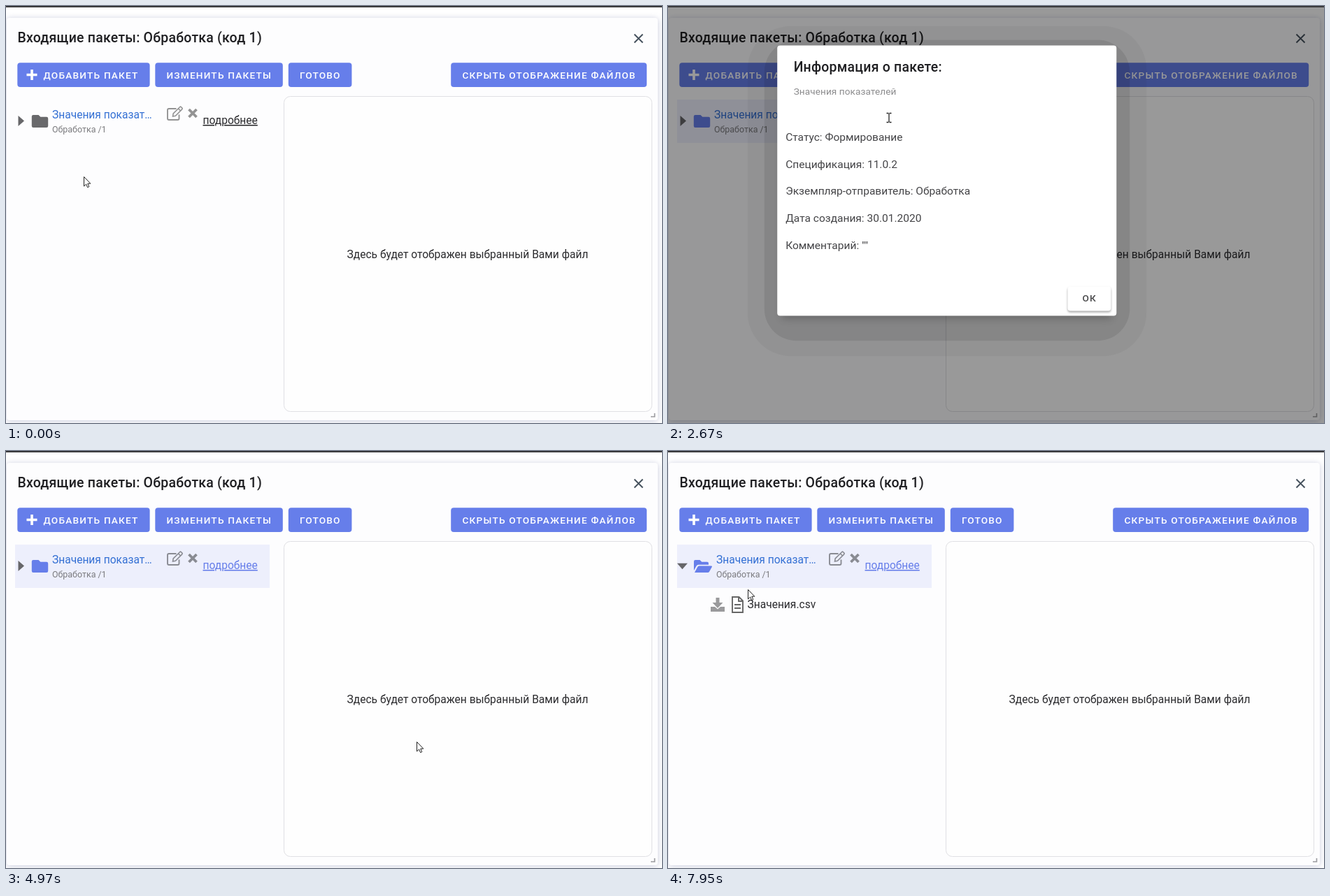
Write an HTML page that moves like this. It is 938x597 px and loops after 8 s.

```html
<!DOCTYPE html>
<html lang="ru">
<head>
<meta charset="utf-8">
<style>
html, body { margin: 0; width: 100%; height: 100%; overflow: hidden; background: #fff; }
svg { display: block; width: 100vw; height: 100vh; font: 15.57px Roboto, Arial, sans-serif; fill: #2b2b2e; }
.title { font-size: 19.46px; font-weight: 500; letter-spacing: .24px; fill: #1f1f22; }
.btn { font-size: 13.62px; font-weight: 500; letter-spacing: 1.216px; }
.small { font-size: 12.45px; }
.sub { font-size: 13.62px; letter-spacing: .1px; }
.line { fill: none; stroke-linecap: butt; }
.mark { fill: #fff; stroke: #222; }
#panel { filter: drop-shadow(0 1px 4px rgba(70, 80, 140, .3)); }
#under { filter: blur(6px); }
#ok { filter: drop-shadow(0 2px 1.5px rgba(0, 0, 0, .35)); }
</style>
</head>
<body>
<svg viewBox="0 0 938 597" preserveAspectRatio="none">
  <rect id="panel" x="1" y="17" width="931" height="576" rx="4" fill="#fdfdfe"/>
  <rect width="938" height="2" fill="#3a3a3c"/>
  <text class="title" x="16.500" y="52">Входящие пакеты: Обработка (код 1)</text>
  <path class="line" d="M898.500 40.500l12 12m0-12l-12 12" stroke="#46525e" stroke-width="1.900"/>
  <g fill="#667eea">
    <rect x="16.300" y="81.300" width="189.300" height="34.600" rx="4"/>
    <rect x="213.300" y="81.300" width="182.500" height="34.600" rx="4"/>
    <rect x="403.800" y="81.300" width="90.600" height="34.600" rx="4"/>
    <rect x="636.200" y="81.300" width="280" height="34.600" rx="4"/>
  </g>
  <path class="line" d="M29.500 98.500h15M37 91v15" stroke="#fff" stroke-width="3.600"/>
  <g class="btn" fill="#fff">
    <text x="53.500" y="103.500">ДОБАВИТЬ ПАКЕТ</text>
    <text x="229.500" y="103.500">ИЗМЕНИТЬ ПАКЕТЫ</text>
    <text x="420" y="103.500">ГОТОВО</text>
    <text x="652.500" y="103.500">СКРЫТЬ ОТОБРАЖЕНИЕ ФАЙЛОВ</text>
  </g>
  <rect x="397.500" y="129.500" width="526" height="451" rx="9" fill="#fefefe" stroke="#e0e0e4"/>
  <text x="660" y="360.500" text-anchor="middle">Здесь будет отображен выбранный Вами файл</text>
  <path class="line" d="M922 588h5.500v-5" stroke="#9a9a9e" stroke-width="1.600"/>

  <rect id="row" x="13" y="134" width="364" height="62" fill="#edeffc"/>
  <path id="toggle" d="M-4.200-7.500L4.300 0-4.200 7.500z" fill="#666669"/>
  <path id="closed" d="M39 156h7.500l2.800 2.800H58a2.200 2.200 0 0 1 2.200 2.200v10.800A2.200 2.200 0 0 1 58 174H39a2.200 2.200 0 0 1-2.200-2.200v-13.600A2.200 2.200 0 0 1 39 156z"/>
  <path id="opened" fill="#667eea" d="M37 171v-13q0-2 2-2h6.500l2.800 2.800H56q2 0 2 2v2H43.500q-1.800 0-2.700 1.500zM38 174l4.300-8q.7-1.500 2.300-1.500H62q1.600 0 .8 1.500l-3.600 6.500q-.8 1.500-2.500 1.500z"/>
  <g id="name">
    <text x="66" y="161" fill="#3470d4">Значения показат…</text>
    <text class="small" x="66" y="181" fill="#7b7b7e">Обработка /1</text>
  </g>
  <g class="line" stroke="#000" stroke-opacity=".42">
    <path d="M243.500 147H233a2 2 0 0 0-2 2v12a2 2 0 0 0 2 2h12.500a2 2 0 0 0 2-2v-5.500" stroke-width="1.900"/>
    <path d="M238.500 158l.7-4 9.300-9.300q1-1 2 0l1.200 1.200q1 1 0 2l-9.300 9.300zM246.500 147l3 3" stroke-width="1.600"/>
    <path d="M261.500 148l11 11m0-11l-11 11" stroke-width="3.800"/>
  </g>
  <text id="more" x="281.500" y="169" text-decoration="underline">подробнее</text>
  <g id="file">
    <path d="M68.500 210h5v7h5L71 225l-7.500-8h5zM61 223h6l4 3.500 4-3.500h6v7H61z" fill="#9a9a9c"/>
    <path class="line" d="M92 209h9.500l5.500 5.500V231H92zM101 209v6h6M95 220h9M95 225h9" stroke="#666" stroke-width="1.900"/>
    <text x="113.500" y="225">Значения.csv</text>
  </g>

  <rect id="shade" y="2" width="938" height="595" fill="#000"/>
  <g id="dialog">
    <rect id="halo" x="113" y="28" width="572" height="474" rx="62" opacity=".04" fill="#000"/>
    <rect x="137" y="48" width="524" height="432" rx="46" opacity=".09" fill="#000"/>
    <rect id="under" x="162" y="74" width="473" height="374" opacity=".22" fill="#000"/>
    <rect x="155.500" y="56" width="486.500" height="388" rx="4" fill="#fff"/>
    <text class="title" x="179" y="94">Информация о пакете:</text>
    <text class="sub" x="179" y="127" fill="#8b8b8d">Значения показателей</text>
    <g id="facts" fill="#444447"></g>
    <rect id="ok" x="572" y="402" width="62" height="35" rx="4"/>
    <text class="btn" x="593" y="423.500" fill="#4a4a4c">ОК</text>
  </g>

  <g id="cursor">
    <path id="arrow" class="mark" d="M.5.5V14l3.100-3 2 4.700 2.200-1-2-4.500h4z"/>
    <path id="hand" class="mark" d="M-1.500 10V1.500a1.400 1.400 0 0 1 2.900 0V6.200q2.500-.6 2.700.8 2.300-.5 2.500.9 2-.2 2 1.600V13l-1.500 4.500h-8L-5.400 11q-.8-1.800 1-2 1.400.2 2.900 2.500z"/>
    <path id="beam" class="line" d="M-3.500-6.500h3M.5-6.500h3M0-6V6M-3.500 6.500h3M.5 6.500h3" stroke="#222" stroke-width="1.300"/>
  </g>
</svg>
<script>
const $ = id => document.getElementById(id);
const set = (id, name, value) => $(id).setAttribute(name, value);
const show = (id, on) => { $(id).style.display = on ? '' : 'none'; };

$('facts').innerHTML = ['Статус: Формирование', 'Спецификация: 11.0.2',
  'Экземпляр-отправитель: Обработка', 'Дата создания: 30.01.2020', 'Комментарий: ""']
  .map((s, i) => `<text x="167.5" y="${192.7 + i * 38.8}">${s}</text>`).join('');

// Pointer moves: start, end, number of steps, from, to
const moves = [
  [1220, 1950, 6, [111, 244], [316, 166]],
  [3390, 4400, 8, [316, 160], [587, 416]],
  [5120, 5730, 5, [587, 416], [173, 279]],
  [5880, 5880, 1, [173, 279], [57, 224]],
  [6025, 6460, 4, [57, 224], [20, 161]],
  [7670, 7950, 3, [20, 161], [114, 198]]
];
const smooth = p => p * p * (3 - 2 * p);

function pointer(t) {
  let at = moves[0][3];
  for (const [start, end, n, from, to] of moves) {
    if (t < start) break;
    const gap = (end - start) / (n - 1 || 1) || 1;
    const p = smooth(Math.min(1, (Math.floor((t - start) / gap + .001) + 1) / n));
    at = from.map((v, i) => v + (to[i] - v) * p);
  }
  return t >= 2520 && t < 3390 ? [316, 160] : at;
}

function draw(t) {
  const picked = t >= 2520, open = t >= 2520 && t < 4970, expanded = t >= 6900;
  const entering = t < 2670;
  const [x, y] = pointer(t);

  show('row', picked);
  set('closed', 'fill', picked ? '#667eea' : '#69696b');
  set('more', 'fill', picked ? '#667eea' : '#2b2b2e');
  show('closed', !expanded);
  show('opened', expanded);
  show('file', expanded);
  const unfold = t < 7050 ? .4 : t < 7200 ? .8 : 1;
  set('file', 'opacity', unfold);
  set('name', 'transform', `translate(${expanded ? 3 : 0})`);
  set('toggle', 'transform', expanded ? `translate(20.5 165) rotate(${90 * unfold})` : 'translate(21.7 164.5)');

  show('shade', open);
  show('dialog', open);
  show('halo', !entering);
  set('shade', 'opacity', entering ? .32 : .4);
  set('dialog', 'opacity', entering ? .8 : 1);
  const scale = entering ? .912 : t < 2820 ? .997 : 1;
  set('dialog', 'transform', `translate(398.7 250) scale(${scale}) translate(-398.7 -250)`);

  const onOk = open && x > 572 && y > 402;
  set('ok', 'fill', entering ? '#e3e4f0' : t >= 4820 ? '#929292' : t >= 4690 ? '#c8c8c8' : onOk ? '#f2f2f2' : '#fff');

  const onLink = !picked && x > 281 && y < 178;
  const onToggle = t > 5880 && x < 30 && y < 175;
  const onText = open && y < 166;
  const kind = onOk || onLink || onToggle ? 'hand' : onText ? 'beam' : 'arrow';
  for (const id of ['arrow', 'hand', 'beam']) show(id, id === kind);
  set('cursor', 'transform', `translate(${Math.round(x)} ${Math.round(y)})`);
}

const began = performance.now();
function tick() {
  draw((performance.now() - began) % 8000);
  requestAnimationFrame(tick);
}
tick();
</script>
</body>
</html>
```
